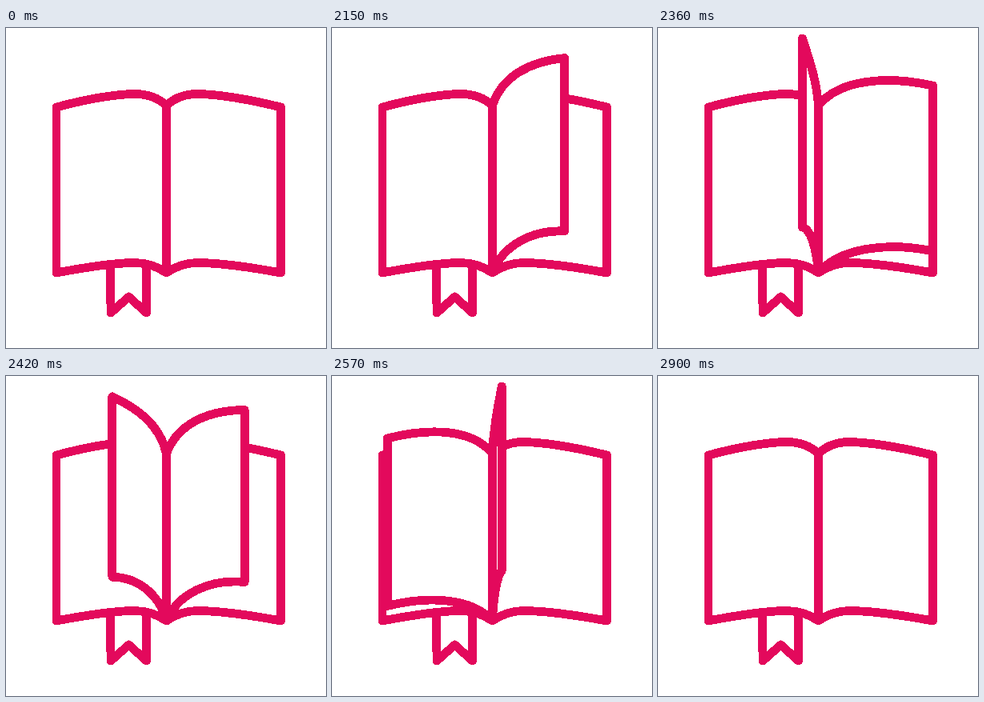
An HTML page for the animation above (2.96 s loop, 400x400 px).

```html
<!DOCTYPE html>
<html lang="en">
<head>
<meta charset="utf-8">
<title>Book</title>
<style>
  html, body { margin: 0; width: 100%; height: 100%; overflow: hidden; background: #fff; }
  svg { display: block; width: 100%; height: 100%; shape-rendering: crispEdges; }
  path { fill: none; stroke: #e3095c; stroke-width: 10.8; stroke-linecap: round; stroke-linejoin: round; }
  .page { fill: #fff; }
</style>
</head>
<body>
<svg viewBox="0 0 400 400">
  <path d="M130.5 297 L131 356 L153.5 336 L175.5 356 V297"/>
  <path d="M200.5 97 C189 86 176 82 158 82.5 C130 83.5 95 90.5 63 99 V306 C95 300 130 294 158 293.5 C176 293 189 298 200.5 306"/>
  <path d="M200.5 97 C212 86 226 82 242 82.5 C270 83.5 311 91 343.5 99 V306 C311 300 270 294 242 293.5 C226 293 212 298 200.5 306"/>
  <path class="page"/>
  <path class="page"/>
  <path d="M200.5 97 V306"/>
</svg>
<script>
const LOOP = 2960, FIRST = 2030, STEP = 30;
const STARTS = [2000, 2280];
const SPINE = { x: 200.5, top: 97, bottom: 306 };
const LIFT = 84;

// outer edge of a turning page: time, x, top, bottom
const TURN = [
  [0, 343.5, 99, 306],
  [80, 343.5, 72, 279],
  [200, 253, 13, 236],
  [360, 180.5, 13, 249],
  [440, 117, 30, 252],
  [480, 80.5, 40, 254],
  [620, 63, 99, 306]
];
const END = TURN.at(-1)[0];
const [lower, upper] = document.querySelectorAll('.page');

function turnAt(u) {
  if (u <= 0 || u >= END) return null;
  const i = TURN.findIndex(key => key[0] > u);
  const a = TURN[i - 1], b = TURN[i];
  const k = (u - a[0]) / (b[0] - a[0]);
  const [, x, top, bottom] = a.map((v, j) => v + (b[j] - v) * k);
  return { x, top, bottom };
}

// Two control points of the curve from the spine to a tip; it bows less as it flattens.
function bend(y0, x, y, bow) {
  const rise = y0 - y;
  const flat = 1 - rise / LIFT;
  const at = (part, up) => `${SPINE.x + (x - SPINE.x) * part} ${y0 - up}`;
  return [
    at(0.1 + 0.12 * flat, bow + 0.0001 * rise * rise * (LIFT - rise)),
    at(0.5 + 0.13 * flat, 10 + rise * (1.36 - 0.01 * rise))
  ];
}

function outline(page) {
  if (!page) return '';
  const { x, top, bottom } = page;
  const [a, b] = bend(SPINE.top, x, top, 29);
  const [c, d] = bend(SPINE.bottom, x, bottom, 26);
  return `M${SPINE.x} ${SPINE.top} C${a} ${b} ${x} ${top} V${bottom} C${d} ${c} ${SPINE.x} ${SPINE.bottom} Z`;
}

function draw(now) {
  const t = now % LOOP;
  const held = t < FIRST ? 0 : FIRST + Math.floor((t - FIRST) / STEP) * STEP;
  const pages = STARTS.map(s => turnAt(held - s));
  // the earlier page lies on top until it crosses the spine
  if (pages[0] && pages[0].x > SPINE.x) pages.reverse();
  lower.setAttribute('d', outline(pages[0]));
  upper.setAttribute('d', outline(pages[1]));
}

const start = performance.now();
function tick() {
  draw(performance.now() - start);
  requestAnimationFrame(tick);
}
tick();
</script>
</body>
</html>
```
